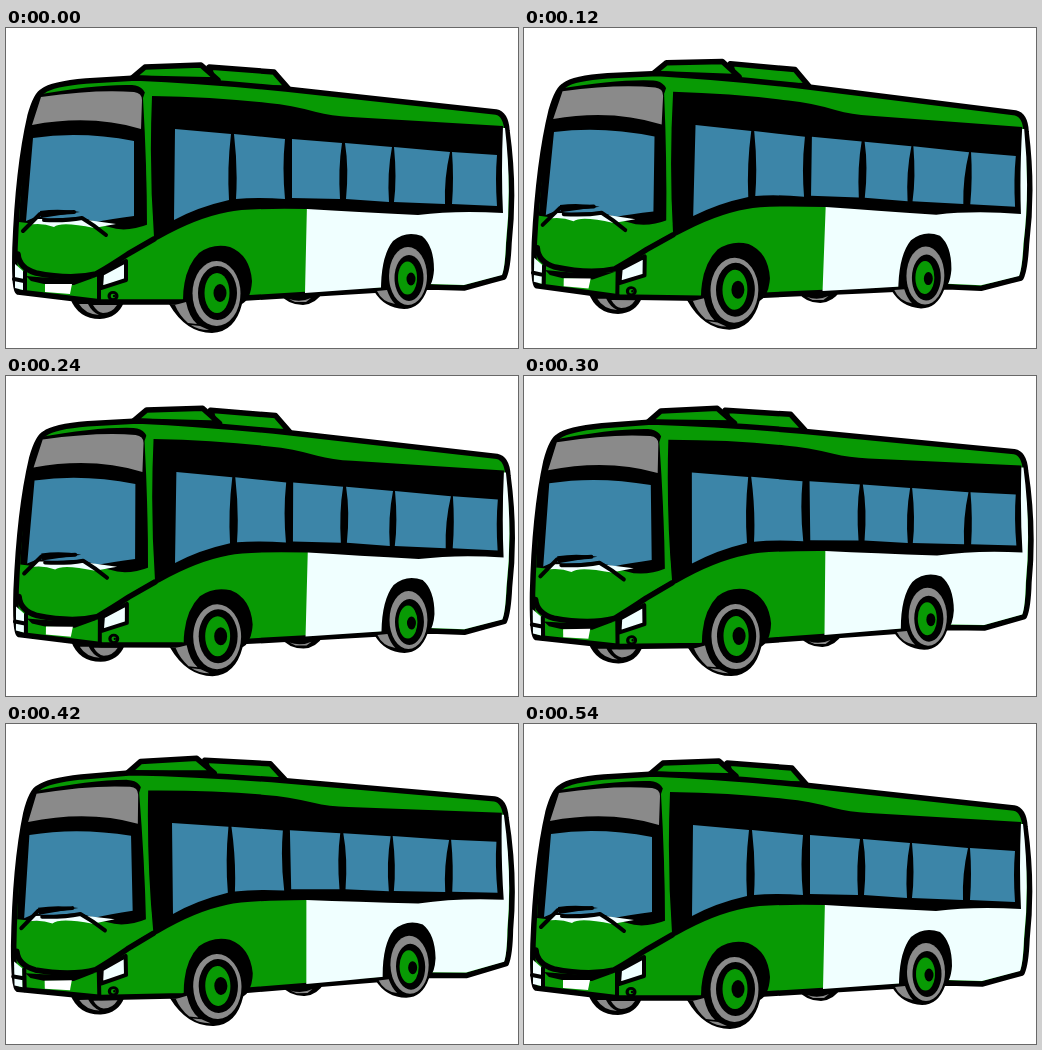
Recreate the animation shown at these times as an HTML page. Size 512 px wide and 320 px high, loop 570 ms.

```html
<!DOCTYPE html>
<html lang="en">
<head>
<meta charset="utf-8">
<title>Rocking bus</title>
<style>
  html, body { margin: 0; width: 100%; height: 100%; overflow: hidden; background: #fff; }
  svg { display: block; width: 512px; height: 320px; }
  .green { fill: #089a04; }
  .glass { fill: #3c85a8; }
  .gray { fill: #8a8a8a; }
  .white { fill: #f0ffff; }
  .line { stroke: #000; stroke-width: 5.5; stroke-linejoin: round; stroke-linecap: round; }
  .thin { stroke-width: 4; }
  .open { fill: none; }
</style>
</head>
<body>
<svg viewBox="0 0 512 320">
  <g id="bus">
    <!-- far wheels -->
    <path d="M64 270Q72 291 94 291Q112 290 118 274Z"/>
    <path class="gray" d="M73 276L82 276Q86 284 93 287Q79 286 73 276ZM87 277H111Q106 285 97 285Q91 284 87 277Z"/>
    <path d="M274 266Q282 277 297 277Q310 276 317 264Z"/>
    <path class="gray" d="M283 271Q294 275 305 270L300 274H289Z"/>

    <!-- roof hatches -->
    <path class="green line" d="M203 39L268 44L282 60H210Z"/>
    <path class="green line" d="M126 50L139 39L195 37L212 52Z"/>

    <!-- body -->
    <path class="green line" d="M37 63Q46 56 80 53L130 50Q200 53 280 61L490 84Q500 86 501 103Q509 160 503 215Q502 240 498 249L458 260L424 259L340 264L240 270L176 274L95 274L12 264Q8 262 9 220Q12 140 24 88Q30 66 37 63Z"/>
    <path class="white" d="M301 175L495 180V100H499Q506 160 500 215Q499 240 496 247L458 257L424 256L340 262L299 265Z"/>

    <!-- side windows -->
    <path d="M146 68Q210 69 262 75Q285 77 310 84Q325 88 345 89L497 98Q495 145 497 185Q450 182 412 187Q350 184 301 181Q240 180 222 184Q190 190 153 211L123 225Q124 221 148 209Q143 140 146 68Z"/>
    <g class="glass">
      <path d="M169 101L225 106Q221 140 223 172Q192 179 168 192Z"/>
      <path d="M228 106L279 111Q276 140 279 171Q250 169 230 171Q232 140 228 106Z"/>
      <path d="M286 111L336 115Q332 140 334 171L286 170Z"/>
      <path d="M339 115L386 119Q381 145 383 174L340 171Q343 140 339 115Z"/>
      <path d="M388 119L444 124Q438 150 439 176L388 174Q391 150 388 119Z"/>
      <path d="M446 124L491 127Q489 150 491 178L446 176Q448 150 446 124Z"/>
    </g>

    <!-- windscreen -->
    <path d="M30 67Q90 56 126 57Q141 58 141 75Q139 140 143 196Q120 205 103 199L75 192L30 196L13 194Q17 110 30 67Z"/>
    <path class="green" d="M137 70Q141 140 141 198L145 207L147 200Q142 140 145 70Q143 64 140 61Z"/>
    <path class="gray" d="M35 69Q90 61 128 64Q136 65 136 72L135 101Q85 86 26 97Z"/>
    <path class="glass" d="M27 110Q75 103 128 113V188Q105 191 90 194L74 189L40 191L32 188L20 193Z"/>
    <path class="white" d="M22 197L30 191H74L110 196L88 200Q55 193 48 199Q35 194 22 197Z"/>
    <path class="line thin open" d="M17 203L34 186L68 184M38 192Q60 193 76 190Q88 197 100 207"/>
    <path d="M34 183Q55 180 74 184L35 190Z"/>

    <!-- front -->
    <path class="line open" d="M12 226Q13 240 30 245Q65 252 90 246Q104 238 122 226L148 211"/>
    <path class="white line thin" d="M96 246L120 233V252L95 260Z"/>
    <path class="white" d="M9 236L17 243V262L9 260Z"/>
    <path class="line thin open" d="M19 244V265M93 247V272M8 251L18 253"/>
    <path d="M20 248Q60 252 90 249L68 257L38 256L25 253Z"/>
    <path d="M39 256H66L64 266L39 264Z" fill="#fff"/>
    <ellipse cx="107" cy="268" rx="5.5" ry="5"/>
    <circle class="green" cx="107" cy="268" r="2.3"/>
    <circle cx="108" cy="268" r="1.2"/>

    <!-- front wheel -->
    <path d="M177 277Q176 242 193 225Q207 215 224 219Q244 227 246 253Q245 271 236 276Q229 304 206 305Q180 305 163 276Z"/>
    <path class="gray" d="M169 277L180 274Q183 289 191 296L182 295Q173 287 169 277ZM185 297L194 298L203 302Q192 302 185 297Z"/>
    <ellipse class="gray" cx="210.500" cy="265.500" rx="24" ry="32.500"/>
    <ellipse cx="211.500" cy="265" rx="19.500" ry="27"/>
    <ellipse class="green" cx="211" cy="265" rx="12.500" ry="20"/>
    <ellipse cx="214" cy="265" rx="6.500" ry="9"/>

    <!-- rear wheel -->
    <path d="M375 262Q375 228 387 213Q400 202 416 208Q428 218 428 242Q427 256 421 262Q414 281 398 281Q378 280 368 263Z"/>
    <path class="gray" d="M371 263L381 262Q384 271 389 276Q376 274 371 263Z"/>
    <ellipse class="gray" cx="402" cy="248" rx="19" ry="29"/>
    <ellipse cx="403" cy="250" rx="14.500" ry="23"/>
    <ellipse class="green" cx="401.500" cy="250" rx="9.500" ry="16.500"/>
    <ellipse cx="405" cy="251" rx="4.500" ry="6.500"/>
  </g>
</svg>
<script>
const bus = document.getElementById('bus');
const LOOP = 570, CYCLE = 540, STEP = 30;

// time, angle, x shift, y shift, horizontal scale
const poses = [
  [0, 0, 0, 0, 1],
  [120, 0.85, 1.3, -2.6, 0.996],
  [180, 1, 1.8, -3.5, 0.993],
  [300, -0.7, 0, -5.5, 1.005],
  [360, -1.5, -1, -5.7, 1.006],
  [420, -1.25, -1.2, -4, 1.006],
];
const at = i => {
  const n = poses.length, [time, ...rest] = poses[(i + n) % n];
  return [time + CYCLE * Math.floor(i / n), ...rest];
};

// Smooth curve through the poses, with slopes taken from the neighbours.
function poseAt(t) {
  const i = poses.findLastIndex(p => p[0] <= t);
  const [a, b, c, d] = [at(i - 1), at(i), at(i + 1), at(i + 2)];
  const span = c[0] - b[0], u = (t - b[0]) / span, v = 1 - u;
  return [1, 2, 3, 4].map(k => {
    const m0 = span * (c[k] - a[k]) / (c[0] - a[0]);
    const m1 = span * (d[k] - b[k]) / (d[0] - b[0]);
    return v * v * ((1 + 2 * u) * b[k] + u * m0) + u * u * ((3 - 2 * u) * c[k] - v * m1);
  });
}

function draw(now) {
  const t = Math.floor((now % LOOP) / STEP) * STEP;
  const [angle, x, y, scale] = poseAt(t % CYCLE);
  bus.setAttribute('transform',
    `translate(${256 + x} ${160 + y}) rotate(${angle}) scale(${scale} 1) translate(-256 -160)`);
  requestAnimationFrame(draw);
}
draw(0);
</script>
</body>
</html>
```
